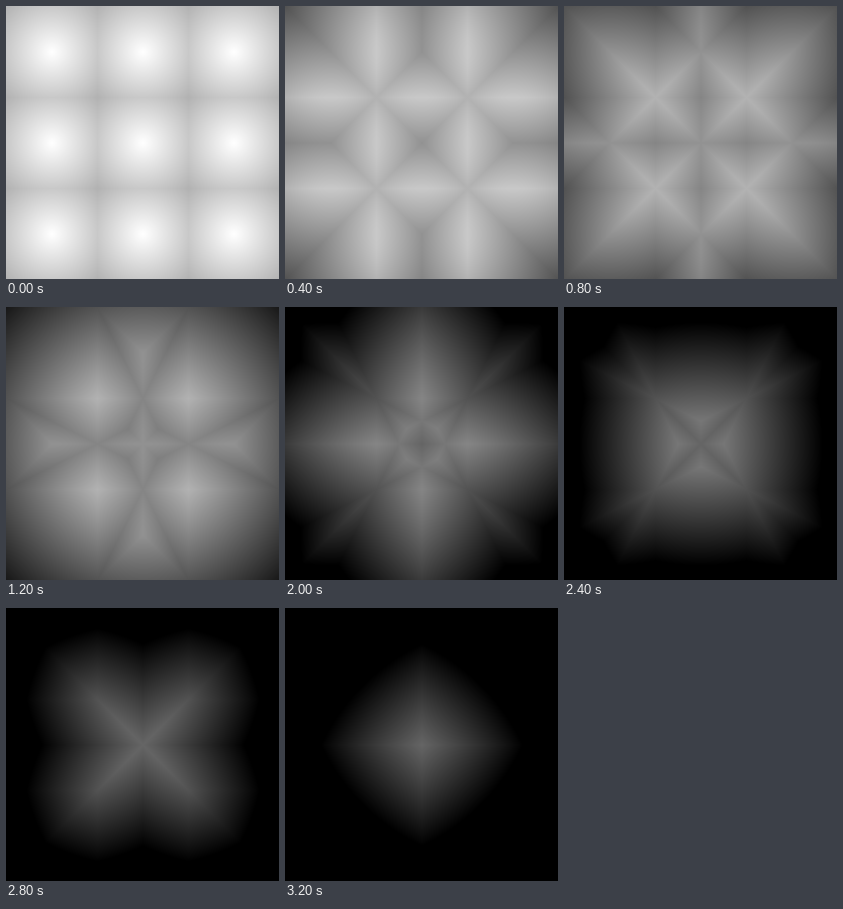
These frames come from a looping animation (273x273 px, 3.6 s). An HTML page with a canvas:

```html
<!DOCTYPE html>
<html>
<head>
<meta charset="utf-8">
<style>
html, body { margin: 0; width: 100%; height: 100%; overflow: hidden; background: #000; }
canvas { display: block; }
</style>
</head>
<body>
<canvas id="stage" width="273" height="273"></canvas>
<script>
// Cellular noise on a 3x3 grid: each step shades by the distance to the next-nearest seed.
const SIZE = 273, CELL = SIZE / 3, STEP = 400, FADE = 1.2;
const ctx = document.getElementById('stage').getContext('2d');

const seeds = [];
for (let row = 0; row < 3; row++)
  for (let col = 0; col < 3; col++)
    seeds.push([(col + 0.5) * CELL, (row + 0.5) * CELL]);

const images = seeds.map(() => ctx.createImageData(SIZE, SIZE));
for (let y = 0; y < SIZE; y++) {
  for (let x = 0; x < SIZE; x++) {
    const dists = seeds.map(([sx, sy]) => Math.hypot(x - sx, y - sy)).sort((a, b) => a - b);
    const at = (y * SIZE + x) * 4;
    dists.forEach((d, rank) => {
      const grey = 255 - FADE * d;
      images[rank].data.set([grey, grey, grey, 255], at);
    });
  }
}

const start = performance.now();
function draw() {
  const time = performance.now() - start;
  ctx.putImageData(images[Math.floor(time / STEP) % images.length], 0, 0);
  requestAnimationFrame(draw);
}
draw();
</script>
</body>
</html>
```
